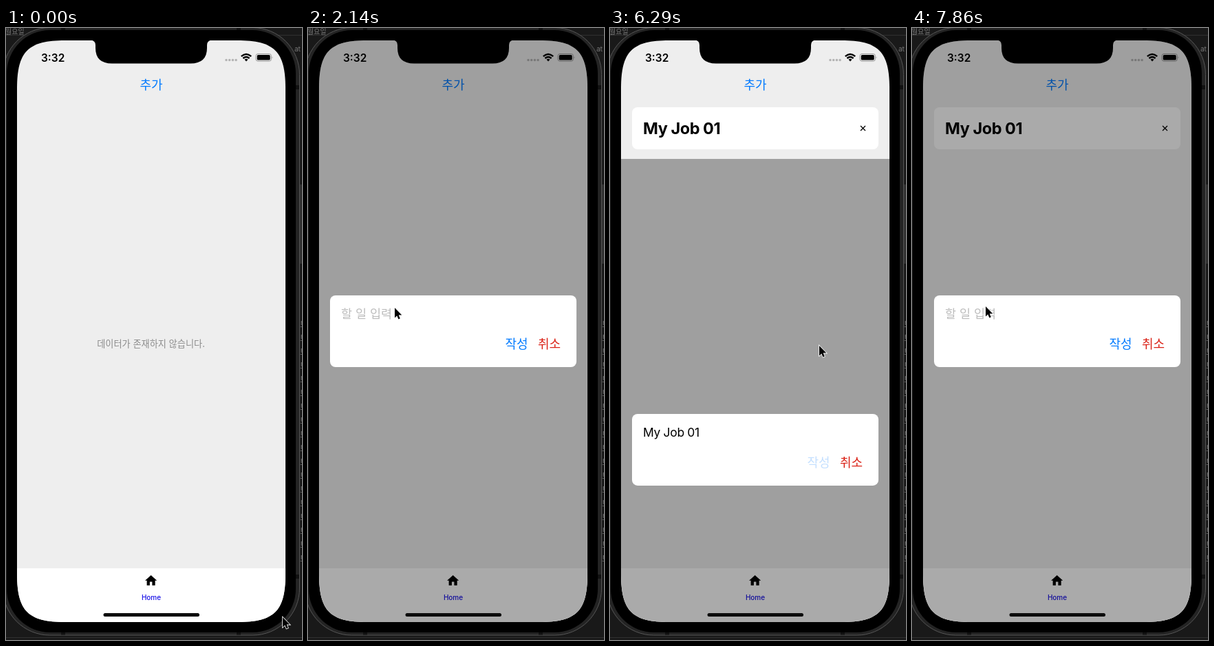
Write an HTML page that moves like this. It is 430 px wide and 888 px high and loops after 8 s.

```html
<!DOCTYPE html>
<html lang="ko">
<head>
<meta charset="utf-8">
<title>Todo app</title>
<style>
  html, body { margin: 0; width: 100%; height: 100%; overflow: hidden; background: #191919; }
  svg { display: block; width: 430px; height: 888px; }
  text { font: 18px "Noto Sans CJK KR", "Noto Sans CJK", sans-serif; white-space: pre; }
  .latin { font-family: Inter, "Noto Sans", sans-serif; }
  .mid { text-anchor: middle; }
  .blue { fill: #007aff; }
  .red { fill: #da2015; }
</style>
</head>
<body>
<svg viewBox="0 0 430 888">
  <defs>
    <!-- continuous corners: flatter near the edges than a circle -->
    <clipPath id="screen">
      <path d="M16 88c0-54 16-70 70-70H336c54 0 70 16 70 70V792c0 54-16 70-70 70H86c-54 0-70-16-70-70Z"/>
    </clipPath>
  </defs>

  <!-- desktop behind the phone -->
  <rect width="430" height="888" fill="#191919"/>
  <path d="M0 10.5H430M0 884.5H430" stroke="#303030"/>
  <rect x="427" y="227" width="3" height="115" fill="#303030"/>
  <g id="desktop" fill="#777">
    <text x="-1" y="9" style="font-size:10px">월요일</text>
    <text x="419" y="34" class="latin" style="font-size:10px">at</text>
  </g>

  <!-- phone body -->
  <rect x="-4.5" y="-.5" width="431" height="881.5" rx="68" fill="#242424" stroke="#565656"/>
  <path d="M83 0V4M338 0V4M83 876V880.5M338 876V880.5M421 86H426M421 796H426" stroke="#111" stroke-width="6"/>
  <rect x="1" y="3" width="420" height="874" rx="63"/>

  <g clip-path="url(#screen)">
    <rect x="16" y="18" width="390" height="844" fill="#eee"/>
    <text x="51" y="48.5" class="latin" style="font-size:15.5px;font-weight:600">3:32</text>
    <path d="M320 46.5h14.1" stroke="#b4b4b4" stroke-width="3.6" stroke-linecap="round" stroke-dasharray="0 4.7"/>
    <g fill="none" stroke="#000" stroke-width="2.4">
      <path d="M341.8 41.2Q349 34.6 356.2 41.2M344.4 44Q349 39.9 353.6 44"/>
      <path d="M349 48.4L346.5 45.8Q349 43.6 351.5 45.8Z" fill="#000" stroke="none"/>
    </g>
    <rect x="363" y="37.5" width="22.4" height="10.6" rx="3" fill="none" stroke="#999"/>
    <rect x="364.7" y="39.1" width="19" height="7.4" rx="1.6"/>
    <path d="M386.6 41.2Q388.4 42.8 386.6 44.5Z" fill="#999"/>

    <text id="add" x="211" y="88.5" class="mid blue">추가</text>
    <text id="empty" x="210.5" y="462.5" class="mid" fill="#8c8c8c" style="font-size:13.2px">데이터가 존재하지 않습니다.</text>
    <g id="item">
      <rect x="32" y="115" width="358" height="61" rx="8" fill="#fff"/>
      <text x="48" y="154" class="latin" style="font-size:23.5px;font-weight:700;letter-spacing:-.02em">My Job 01</text>
      <path d="M364 142l7 7m0-7l-7 7" stroke="#000" stroke-width="1.3"/>
    </g>

    <rect x="16" y="784" width="390" height="78" fill="#fff"/>
    <path transform="translate(200.3 791.5) scale(.86)" d="M10 20v-6h4v6h5v-8h3L12 3 2 12h3v8z"/>
    <text x="211" y="829.5" class="latin mid" fill="#1810e6" style="font-size:10px;font-weight:500">Home</text>

    <g id="modal">
      <rect x="16" y="18" width="390" height="844" fill="#000" fill-opacity=".333"/>
      <rect x="32" y="388" width="358" height="104" rx="8" fill="#fff"/>
      <text id="hint" x="48" y="420.5" fill="#bdbdbd" style="font-size:17.5px">할 일 입력</text>
      <text id="input" x="48" y="421" class="latin" style="font-size:17.5px;letter-spacing:-.02em"></text>
      <rect id="caret" y="404" width="2" height="22" rx="1" fill="#3d50e8"/>
      <text id="write" x="303" y="465" class="mid blue">작성</text>
      <text x="350.5" y="465" class="mid red">취소</text>
    </g>
    <rect x="141.5" y="849" width="139.5" height="5" rx="2.5" fill="#0c0c0c"/>
  </g>
  <path d="M123 17.5Q130 18 130 25V29Q130 51.5 154 51.5H268Q292 51.5 292 29V25Q292 18 299 17.5Z"/>

  <path id="cursor" d="M0 0V14.5L3.3 11.5 5.4 16.5 7.8 15.5 5.7 10.6H10.3Z" stroke="#fff" stroke-width="1.6" paint-order="stroke"/>
</svg>
<script>
  const el = id => document.getElementById(id);
  const [add, empty, item, modal, hint, input, caret, write, cursor] =
    ['add', 'empty', 'item', 'modal', 'hint', 'input', 'caret', 'write', 'cursor'].map(el);

  const LOOP = 8000, STEPS = 56, SCREEN_HEIGHT = 844;
  const OPEN = 1263, SUBMIT = 6240, REOPEN = 7120;
  const TITLE = 'My Job 01';
  const KEY_TIMES = [3140, 3570, 3710, 4000, 4140, 4280, 4570, 4710, 4930];
  // time, x, y of the pointer tip
  const POINTER = [
    [140, 402, 855], [1110, 209, 85], [1300, 209, 85], [2120, 126, 406],
    [4800, 125, 406], [5290, 125, 406], [6060, 304, 461], [6300, 304, 461],
    [6950, 209, 85], [7150, 209, 85], [7700, 107, 404]
  ];

  // Lines of text cut off by the right edge
  for (let y = 434; y <= 774; y += 20) {
    el('desktop').insertAdjacentHTML('beforeend',
      `<text x="427" y="${y}" style="font-size:11px">트</text>`);
  }

  const clamp = v => Math.min(1, Math.max(0, v));
  const show = (node, on) => node.setAttribute('visibility', on ? 'inherit' : 'hidden');

  // Critically damped spring, from 1 to 0
  function spring(ms) {
    const x = Math.max(0, ms) * 0.01826;
    return (1 + x) * Math.exp(-x);
  }

  function modalOffset(t) {
    if (t < SUBMIT) return spring(t - OPEN);
    if (t < REOPEN) return 1 - spring(t - SUBMIT);
    return spring(t - REOPEN);
  }

  // Dims while pressed, then fades back in 250 ms
  function pressOpacity(t, release) {
    if (t < release - 110) return 1;
    const p = clamp((t - release) / 250);
    return 0.2 + 0.8 * (p < 0.5 ? 2 * p * p : 1 - 2 * (1 - p) ** 2);
  }

  function pointerAt(t) {
    const next = POINTER.findIndex(key => key[0] > t);
    if (next < 1) return POINTER.at(next).slice(1);
    const [a, b] = [POINTER[next - 1], POINTER[next]];
    const p = (t - a[0]) / (b[0] - a[0]), ease = p * p * (3 - 2 * p);
    return [1, 2].map(i => a[i] + (b[i] - a[i]) * ease);
  }

  function draw(t) {
    const submitted = t >= SUBMIT;
    const typed = t > 6720 ? '' : TITLE.slice(0, KEY_TIMES.filter(k => t >= k - 5).length);

    input.textContent = typed;
    show(hint, !typed);
    show(caret, t >= 2425 && t < 6100);
    caret.setAttribute('x', 47 + (typed ? input.getComputedTextLength() : 0));

    show(empty, !submitted);
    show(item, submitted);
    add.setAttribute('opacity', pressOpacity(t, t < SUBMIT ? OPEN - 10 : REOPEN - 10));
    write.setAttribute('opacity', t < 6720 ? pressOpacity(t, SUBMIT + 10) : 1);
    modal.setAttribute('transform', `translate(0 ${modalOffset(t) * SCREEN_HEIGHT})`);
    cursor.setAttribute('transform', `translate(${pointerAt(t)})`);
  }

  const start = performance.now();
  function tick() {
    const elapsed = (performance.now() - start) % LOOP;
    const step = Math.min(STEPS - 1, Math.floor((elapsed + 5) * STEPS / LOOP));
    draw(step * LOOP / STEPS);
    requestAnimationFrame(tick);
  }
  tick();
</script>
</body>
</html>
```
